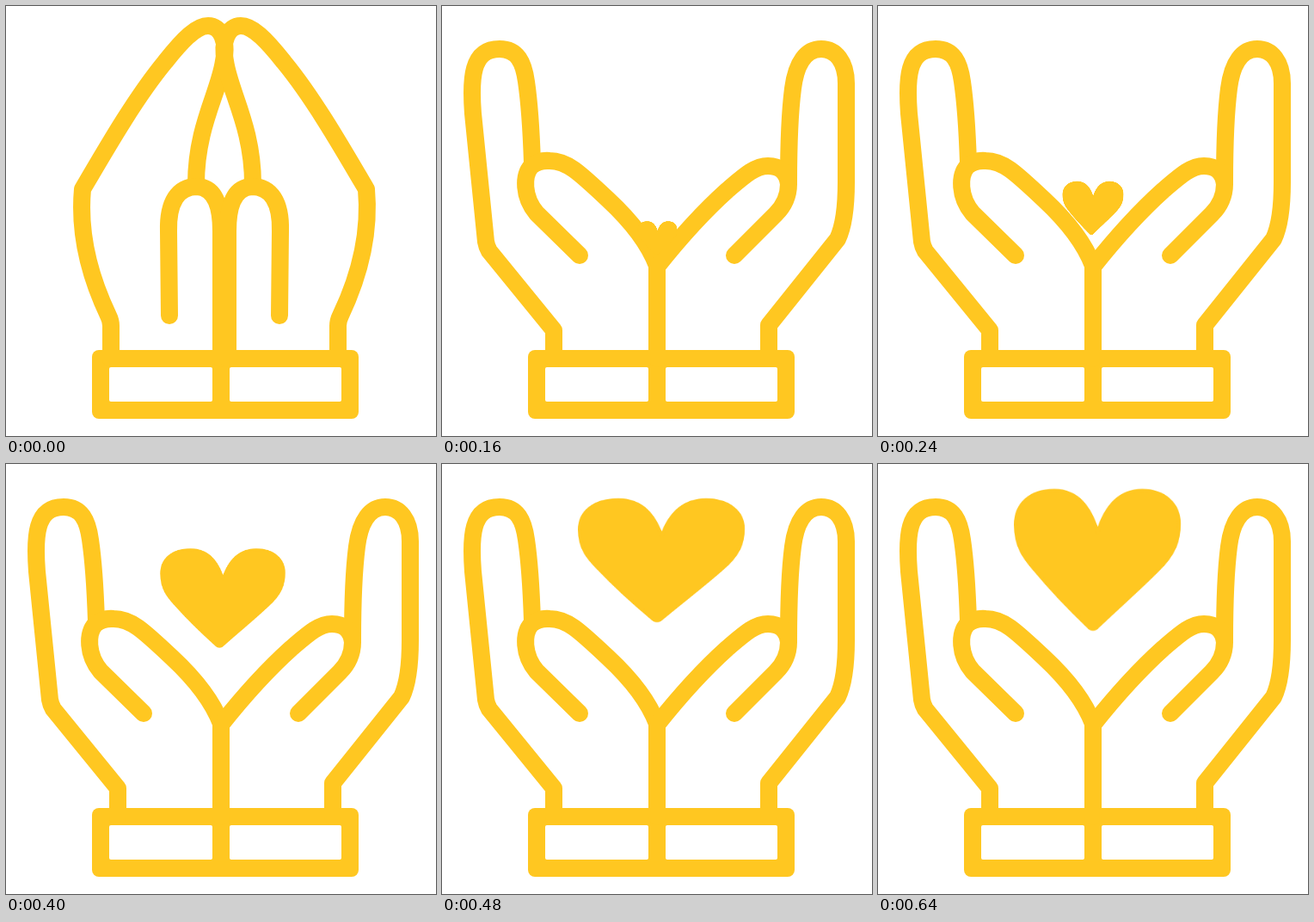
An HTML page that plays this animation: 500 px wide and 500 px high, repeating every 1040 ms.

```html
<!DOCTYPE html>
<html lang="en">
<head>
<meta charset="utf-8">
<title>Open hands and heart</title>
<style>
  html, body { margin: 0; height: 100%; overflow: hidden; background: #fff; }
  svg { display: block; width: 100vw; height: 100vh; }
  .line { fill: none; stroke: #ffc721; stroke-width: 20; stroke-linecap: round; stroke-linejoin: round; }
  .cuff { fill: #ffc721; }
  .gap { fill: #fff; }
  .heart { fill: #ffc721; stroke: #ffc721; stroke-width: 4; stroke-linejoin: round; }
  .pose, .heart { animation: 1040ms step-end infinite; }
  .closed { animation-name: closed; }
  .parting { animation-name: parting; }
  .open { animation-name: open; }
  .heart { animation-name: rise; }

  @keyframes closed { 0% { opacity: 1 } 7.692%, 100% { opacity: 0 } }
  @keyframes parting { 0% { opacity: 0 } 7.692% { opacity: 1 } 15.384%, 100% { opacity: 0 } }
  @keyframes open { 0% { opacity: 0 } 15.384%, 100% { opacity: 1 } }

  /* The heart grows out of the palms, then squashes, stretches and settles. */
  @keyframes rise {
    0% { opacity: 0; transform: translate(250.5px, 270px) scale(.237, .24) }
    15.384% { opacity: 1; transform: translate(250.5px, 270px) scale(.237, .24) }
    23.076% { opacity: 1; transform: translate(250px, 235px) scale(.366, .378) }
    30.769% { opacity: 1; transform: translate(249px, 200.5px) scale(.495, .515) }
    38.461% { opacity: 1; transform: translate(252px, 156px) scale(.75, .7) }
    46.153% { opacity: 1; transform: translate(255px, 112px) scale(1, .873) }
    53.846% { opacity: 1; transform: translate(255px, 111.5px) scale(1, 1.218) }
    61.538%, 100% { opacity: 1; transform: translate(255px, 111.5px) scale(1, 1) }
  }
</style>
</head>
<body>
<svg viewBox="0 0 500 500">
  <defs>
    <g id="half">
      <path d="M122 410V372Q122 366 119 360C98 316 84 268 89 213C120 160 152 105 185 65C207 37 222 23 235 23C250 23 258 42 253 64C248 100 221 140 221 207"/>
      <path d="M190 360L189 262C188 228 200 210 222 210C244 211 250 235 250 262V410"/>
    </g>
  </defs>

  <rect class="cuff" x="100" y="400" width="310" height="80" rx="8"/>
  <rect class="gap" x="120" y="420" width="120" height="40" rx="2"/>
  <rect class="gap" x="260" y="420" width="130" height="40" rx="2"/>

  <g class="line pose closed">
    <use href="#half"/>
    <use href="#half" transform="translate(508) scale(-1 1)"/>
  </g>

  <g class="line pose parting">
    <path d="M130 410V378L77 313Q68 299 69 270Q69 256 72 245C87 180 100 130 124 64C130 46 142 38 154 38C168 39 188 52 185 68L172 160"/>
    <path d="M190 320L160 198C157 178 170 160 186 160C196 160 204 169 209 182Q236 246 250 305"/>
    <path d="M380 410V369L430 305Q441 291 441 268C439 220 425 145 401 82C395 66 385 57 372 57C356 57 346 70 348 92L362 168"/>
    <path d="M310 310L364 189C369 170 355 158 338 158Q328 159 320 171L250 293V410"/>
  </g>

  <g class="line pose open">
    <path d="M130 410V377L55 285Q52 280 51 274L36 125C33 85 34 50 67 50C88 50 95 66 98 88Q103 122 105 182"/>
    <path d="M160 290L110 241C94 222 94 197 104 186Q113 179 125 180C145 180 158 192 193 225Q236 265 250 302"/>
    <path d="M380 410V371L460 271Q470 250 470 205V90C470 65 458 50 441 50C424 50 412 65 408 96Q403 135 403 205"/>
    <path d="M340 290L388 242Q403 227 403 207Q400 186 379 186C364 186 352 197 332 214Q292 250 250 303V410"/>
  </g>

  <path class="heart" d="M.5 -32C-8 -60 -22 -80.500 -50 -80.500C-79 -80.500 -95 -64 -95 -41C-95 -15 -84 -2 -74 10C-54 34 -30 59 -11 77Q-5 84 1 77C24 55 46 36 70 12C90 -7 95 -23 95 -42C95 -65 78 -80.500 52 -80.500C24 -80.500 9 -60 .5 -32Z"/>
</svg>
</body>
</html>
```
